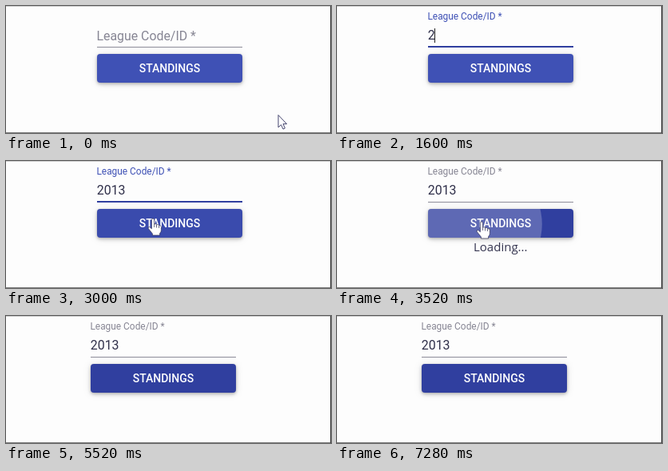
Recreate the animation shown at these times as an HTML page. Size 407 px wide and 159 px high, loop 7320 ms.

```html
<!DOCTYPE html>
<html lang="en">
<head>
<meta charset="utf-8">
<title>League standings form</title>
<style>
  html, body { margin: 0; width: 100%; height: 100%; overflow: hidden; background: #fdfdfd; }
  svg { display: block; width: 407px; height: 159px; }
  text { font-family: Roboto, Arial, sans-serif; font-size: 15.9px; white-space: pre; }
  #button {
    filter: drop-shadow(0 1px 5px rgba(0,0,0,.12)) drop-shadow(0 2px 2px rgba(0,0,0,.14))
      drop-shadow(0 1px 1px rgba(0,0,0,.14));
  }
  #caption { font-size: 14px; font-weight: 500; fill: #fff; }
  #loading { font-family: "Open Sans", "Noto Sans", sans-serif; font-size: 15px; fill: #34344f; }
</style>
</head>
<body>
<svg viewBox="0 0 407 159">
  <defs>
    <clipPath id="face"><rect x="114" y="60" width="182" height="36" rx="4"/></clipPath>
  </defs>
  <rect width="407" height="159" fill="#fdfdfd"/>
  <rect width="407" height="1" fill="#cfcfcf"/>
  <rect y="158" width="407" height="1" fill="#808080"/>
  <rect x="406" width="1" height="159" fill="#444"/>

  <g id="form">
    <text id="label">League Code/ID *</text>
    <text id="value" x="113.8" y="42" fill="#30304a"></text>
    <rect id="caret" y="28" width="1" height="18" fill="#222"/>
    <rect x="114" y="51" width="182" height="1" fill="#8c8b98"/>
    <rect id="line" y="50" height="2" fill="#303f9f"/>
    <rect id="button" x="114" y="60" width="182" height="36" rx="4"/>
    <g clip-path="url(#face)"><circle id="ripple" cx="181" cy="79" fill="#fff"/></g>
    <text id="caption" x="205" y="83" text-anchor="middle">STANDINGS</text>
    <text id="loading" x="204.8" y="113" text-anchor="middle">Loading...</text>
  </g>

  <g id="arrow" stroke="#45456e" fill="#fff" stroke-linejoin="round">
    <path d="M0 0V15.5L3.5 12.2L6 17.6L8.4 16.5L6 11.2H10.6Z"/>
  </g>
  <g id="beam" fill="none" stroke="#333">
    <path d="M-3 -7.5H-1L0 -6.5L1 -7.5H3M0 -6.5V6.5M-3 7.5H-1L0 6.5L1 7.5H3"/>
  </g>
  <g id="hand" stroke="#2b2b50" stroke-width=".7" fill="#fff" stroke-linejoin="round">
    <path d="M-1.6 1.4Q-1.6 0 0 0T1.6 1.4V7Q4 6 4.5 7.8Q7 6.9 7.6 8.7Q10.4 8.2 10.4 10.5V14.5Q10.4 17 8.6 18.5V21H-.6V19L-5.8 12.4Q-6.3 10.4-4.3 10.4L-1.6 12.8Z"/>
    <path fill="none" d="M1.6 7V11M4.5 8V11.5M7.6 9V12"/>
  </g>
</svg>
<script>
const LOOP = 7320, LEFT = 114, WIDTH = 182;
const FOCUS = 600, HOVER = 2880, PRESS = 3288, CLICK = 3400, DONE = 4960;
const KEYS = [1580, 1800, 2020, 2240];
const CODE = "2013";

const el = {};
document.querySelectorAll("[id]").forEach(n => el[n.id] = n);

const set = (node, attrs) => {
  for (const k in attrs) node.setAttribute(k, attrs[k]);
};
const show = (node, on) => set(node, { visibility: on ? "visible" : "hidden" });
const clamp = v => Math.min(1, Math.max(0, v));
const part = (t, start, length) => clamp((t - start) / length);
const mix = (a, b, p) => a + (b - a) * p;
const smooth = p => p * p * (3 - 2 * p);
const out = p => 1 - (1 - p) ** 3;
const blend = (a, b, p) => `rgb(${a.map((v, i) => Math.round(mix(v, b[i], p)))})`;

// cubic-bezier(.4, 0, .2, 1)
function standard(x) {
  let lo = 0, hi = 1;
  for (let i = 0; i < 20; i++) {
    const s = (lo + hi) / 2, r = 1 - s;
    if (1.2 * s * r * r + 0.6 * s * s * r + s ** 3 < x) lo = s; else hi = s;
  }
  return lo * lo * (3 - 2 * lo);
}

function drawField(t) {
  const float = out(part(t, FOCUS, 200));
  const lit = out(part(t, FOCUS, 200)) - out(part(t, PRESS, 200));
  const scale = mix(1, 0.75, float);
  set(el.label, {
    transform: `translate(113.4 ${mix(42.5, 16.8, float)}) scale(${scale})`,
    fill: blend([135, 134, 148], [63, 81, 181], lit)
  });
  set(el.line, { x: LEFT + WIDTH * (1 - lit) / 2, width: WIDTH * lit });

  const count = KEYS.filter(k => t >= k).length;
  el.value.textContent = CODE.slice(0, count);
  const since = t - (count ? KEYS[count - 1] : FOCUS);
  show(el.caret, t >= FOCUS && t < PRESS && since % 1060 < 530);
  set(el.caret, { x: Math.floor(LEFT + count * 8.93) });
}

function drawButton(t) {
  const dark = smooth(part(t, HOVER, 300));
  set(el.button, { fill: blend([63, 81, 181], [48, 63, 159], dark) });
  set(el.ripple, {
    r: 115 * standard(part(t, PRESS, 550)),
    opacity: t < PRESS ? 0 : 0.22 * (1 - smooth(part(t, 3520, 430)))
  });
  show(el.loading, t >= CLICK && t < DONE);
}

function drawPointer(t) {
  const place = (node, x, y) => set(node, { transform: `translate(${x} ${y})` });

  const go = smooth(part(t, 80, 440));
  const ax = mix(341, 190, go), ay = mix(136.5, 40, go);
  const overField = ay < 54;
  place(el.arrow, ax, ay);
  show(el.arrow, t < 520 && !overField);

  const down = smooth(part(t, 2720, 270));
  const press = smooth(part(t, 3040, 200));
  const hx = mix(mix(190, 184, down), 181, press);
  const hy = mix(mix(40, 72, down), 76, press);
  const back = t >= 2640;
  place(el.beam, back ? hx : ax, back ? hy : ay);
  show(el.beam, (overField && t < KEYS[0]) || (back && t < HOVER));
  place(el.hand, hx, hy);
  show(el.hand, t >= HOVER && t < DONE);
}

function draw(t) {
  set(el.form, { transform: `translate(${t >= DONE ? -8 : 0} 0)` });
  drawField(t);
  drawButton(t);
  drawPointer(t);
}

const start = performance.now();
function tick() {
  draw((performance.now() - start) % LOOP);
  requestAnimationFrame(tick);
}
draw(0);
requestAnimationFrame(tick);
</script>
</body>
</html>
```
